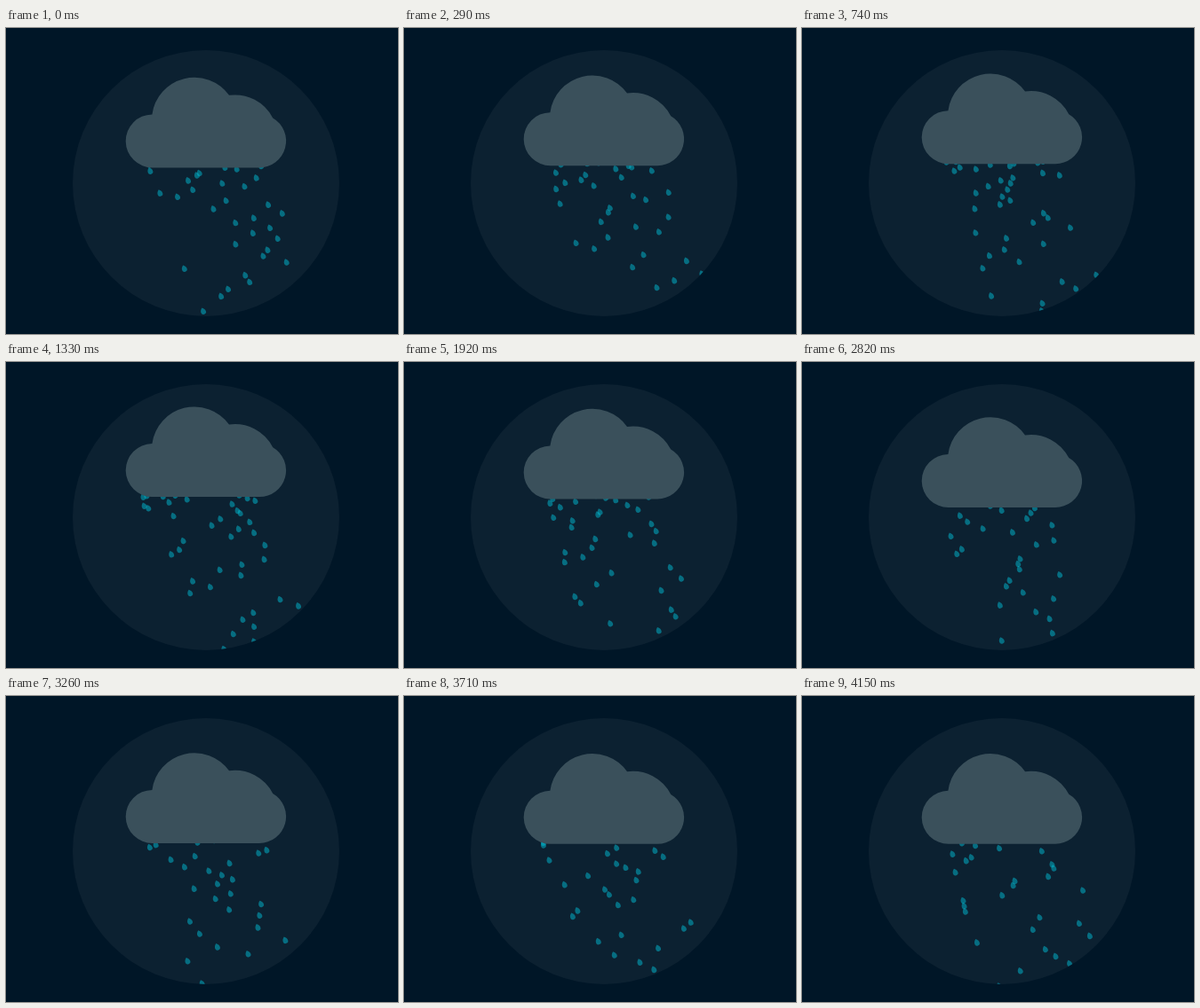
Recreate the animation shown at these times as an HTML page. Size 441 px wide and 345 px high, loop 4250 ms.

```html
<!DOCTYPE html>
<html lang="en">
<head>
<meta charset="utf-8">
<title>Rain cloud</title>
<style>
  html, body { margin: 0; width: 100%; height: 100%; overflow: hidden; background: #001627; }
  svg { display: block; width: 100vw; height: 100vh; }
  .sky { fill: #0c2131; }
  .cloud { fill: #3a505b; }
  .drops { fill: #00bcd4; fill-opacity: .5; }
</style>
</head>
<body>
<svg viewBox="0 0 441 345">
  <defs>
    <clipPath id="disc"><circle cx="225" cy="175" r="150"/></clipPath>
    <path id="drop" transform="rotate(-20)" d="M0-4C2-2.4 2.9-.8 2.9.9A2.9 2.9 0 0 1-2.9.9C-2.9-.8-2-2.4 0-4Z"/>
  </defs>
  <circle class="sky" cx="225" cy="175" r="150"/>
  <g class="drops" clip-path="url(#disc)"></g>
  <path class="cloud" d="M165 152A30 30 0 0 1 164.4 92A48 48 0 0 1 251 70.4A48 48 0 0 1 300.2 96.1A30 30 0 0 1 285 152Z"/>
</svg>
<script>
const LOOP = 4250, STEP = 148.2;
const COUNT = 40, FALL = 1100, TOP = 150, DROP = 178, SLANT = 0.36;
const LEFT = 150, SPREAD = 143;
const BOB = 2500, BOB_START = 1575, BOB_HEIGHT = 15;

const cloud = document.querySelector('.cloud');
const layer = document.querySelector('.drops');

const drops = Array.from({ length: COUNT }, () => {
  const el = document.createElementNS('http://www.w3.org/2000/svg', 'use');
  el.setAttribute('href', '#drop');
  return layer.appendChild(el);
});

function random(i, n) {
  const v = Math.sin(i * 127.1 + n * 311.7 + 4.2) * 43758.5453;
  return v - Math.floor(v);
}

// cubic-bezier(.25, .1, .25, 1)
function ease(x) {
  const curve = (s, a, b) => 3 * (1 - s) * (1 - s) * s * a + 3 * (1 - s) * s * s * b + s * s * s;
  let lo = 0, hi = 1;
  for (let k = 0; k < 24; k++) {
    const mid = (lo + hi) / 2;
    if (curve(mid, .25, .25) < x) lo = mid; else hi = mid;
  }
  return curve(lo, .1, 1);
}

function bob(t) {
  const u = (t - BOB_START) / BOB + 2;
  const leg = Math.floor(u), p = ease(u - leg);
  return BOB_HEIGHT * (leg % 2 ? 1 - p : p);
}

function move(el, x, y) {
  el.setAttribute('transform', `translate(${x.toFixed(2)} ${y.toFixed(2)})`);
}

function draw(t) {
  move(cloud, 0, bob(t));
  drops.forEach((el, i) => {
    // Each fall starts from a new place under the cloud
    const age = i / COUNT + t / FALL;
    const n = Math.floor(age), f = age - n;
    const fall = DROP * f * f;
    move(el, LEFT + SPREAD * random(i, n) + SLANT * fall, TOP + fall);
  });
}

function tick() {
  const t = performance.now() % LOOP;
  draw(Math.floor((t + 8) / STEP) * STEP);
  requestAnimationFrame(tick);
}
tick();
</script>
</body>
</html>
```
